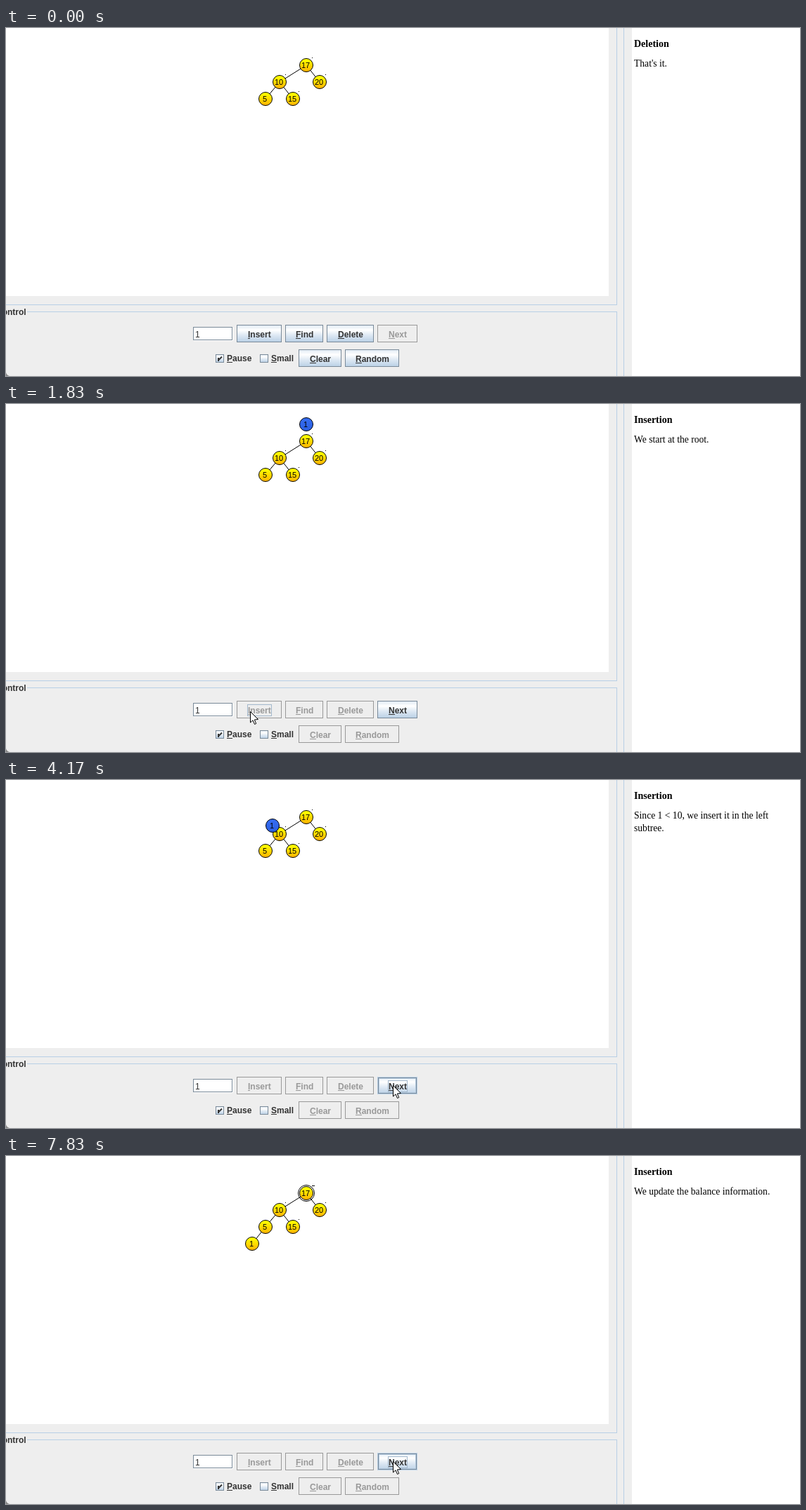
Recreate the animation shown at these times as an HTML page with a canvas. Size 1129 px wide and 496 px high, loop 8 s.

```html
<!DOCTYPE html>
<html lang="en">
<head>
<meta charset="utf-8">
<title>Tree insertion</title>
<style>
html, body { margin: 0; width: 100%; height: 100%; overflow: hidden; background: #eee; }
canvas { display: block; }
</style>
</head>
<body>
<canvas id="stage" width="1129" height="496"></canvas>
<script>
const g = document.getElementById('stage').getContext('2d');
const LOOP = 8000, TICK = 30, MOVE = 480, LEVEL = 24;
const SANS = '"Liberation Sans", Arial, sans-serif';
const SERIF = '"Liberation Serif", "Times New Roman", serif';
const LINE = '#b8cfe5', BORDER = '#7a8a99', FOCUS = '#a3b8cc';

// Columns follow key order, rows follow depth.
const keys = [1, 5, 10, 15, 17, 20];
const depth = { 17: 0, 10: 1, 20: 1, 5: 2, 15: 2, 1: 3 };
const edges = [[17, 10], [17, 20], [10, 5], [10, 15]];
const place = key => [Math.round(350 + 19.25 * keys.indexOf(key)), 53 + LEVEL * depth[key]];
const above = key => [place(key)[0], place(key)[1] - LEVEL];

// Each step: button press, release, the new node's goal or the ringed key, message
const steps = [
  { press: 900, at: 990, goal: above(17), lines: ['We start at the root.'] },
  { press: 2640, at: 2730, goal: above(10), lines: ['Since 1 < 17, we insert it in the left', 'subtree.'] },
  { press: 3780, at: 3960, goal: above(5), lines: ['Since 1 < 10, we insert it in the left', 'subtree.'] },
  { press: 5190, at: 5340, goal: place(1), lines: ['Node has been inserted. We go back and', 'update the balance information.'] },
  { press: 6540, at: 6690, ring: 5, lines: ['We update the balance information.'] },
  { press: 7650, at: 7830, ring: 17, lines: ['We update the balance information.'] }
];
const LINKED = steps[3].at;

const flick = (p, axis) => 1 - (1 - p) ** (6 + axis);
const glide = p => p * p * (3 - 2 * p);
const pointerStart = [1088, 73];
const legs = [
  { at: 150, span: 600, goal: [343, 441], ease: flick },
  { at: 1740, span: 90, goal: [347, 438], ease: glide },
  { at: 2130, span: 360, goal: [550, 435], ease: glide }
];

const mix = (a, b, p) => a + (b - a) * p;

function box(x, y, w, h, fill) {
  g.fillStyle = fill;
  g.fillRect(x, y, w, h);
}

function outline(x, y, w, h, color) {
  g.strokeStyle = color;
  g.strokeRect(x + .5, y + .5, w - 1, h - 1);
}

function text(s, x, y, font, color = '#000', align = 'left') {
  g.font = font;
  g.fillStyle = color;
  g.textAlign = align;
  g.fillText(s, x, y);
}

function line(x1, y1, x2, y2, color = '#000') {
  g.strokeStyle = color;
  g.beginPath();
  g.moveTo(x1, y1);
  g.lineTo(x2, y2);
  g.stroke();
}

function circle([x, y], r) {
  g.beginPath();
  g.arc(x, y, r, 0, 7);
  g.strokeStyle = '#000';
  g.stroke();
}

function shade(y, h, ...stops) {
  const fill = g.createLinearGradient(0, y, 0, y + h);
  for (const [at, color] of stops) fill.addColorStop(at, color);
  return fill;
}

const gloss = (y, h) => shade(y, h, [0, '#dde8f3'], [.3, '#fff'], [.6, '#dde8f3'], [1, LINE]);

function label(s, x, y, color) {
  text(s, x, y, 'bold 12px ' + SANS, color);
  box(x, y + 1, Math.round(g.measureText(s[0]).width), 1, color);
}

function button(s, x, y, w, { enabled = true, hover, pressed, focus } = {}) {
  const h = 25;
  box(x, y, w, h, !enabled ? '#eee' : pressed ? LINE : gloss(y, h));
  if (enabled && hover && !pressed) {
    outline(x, y, w, h, LINE);
    outline(x + 2, y + 2, w - 4, h - 4, LINE);
    outline(x + 1, y + 1, w - 2, h - 2, BORDER);
  } else {
    outline(x, y, w, h, enabled ? BORDER : '#999');
  }
  if (enabled && pressed) {
    box(x, y, w, 2, BORDER);
    box(x, y, 2, h, BORDER);
  }
  g.font = 'bold 12px ' + SANS;
  const tw = Math.round(g.measureText(s).width), tx = Math.round(x + (w - tw) / 2);
  if (focus) outline(tx - 1, y + 5, tw + 2, 17, FOCUS);
  label(s, tx, y + 18, enabled ? '#333' : '#999');
}

function checkbox(s, x, checked) {
  const y = 465;
  box(x, y, 12, 12, gloss(y, 12));
  outline(x, y, 12, 12, BORDER);
  if (checked) {
    box(x + 3, y + 5, 2, 5, '#333');
    g.lineWidth = 2;
    line(x + 4, y + 8.5, x + 9, y + 3.5, '#333');
    g.lineWidth = 1;
  }
  label(s, x + 16, 475, '#333');
}

function node(key, [x, y], blue) {
  const colors = blue ? ['#346cf2', '#2c5fe0'] : ['#ffff00', '#ffb000'];
  g.fillStyle = shade(y - 10, 20, [.1, colors[0]], [1, colors[1]]);
  g.beginPath();
  g.arc(x, y, 9.5, 0, 7);
  g.fill();
  circle([x, y], 9.5);
  text(key, x - 1, y + 4, '11px ' + SANS, '#000', 'center');
}

// The new node enters from beyond the corner and hops in ten equal jumps.
function newNodeAt(t) {
  let spot = [-10, -9];
  for (const { at, goal } of steps) {
    if (!goal || t < at) break;
    const jumps = Math.floor((t - at) / MOVE * 9 + .07) + 1;
    const p = Math.min(1, jumps / 10);
    spot = spot.map((v, i) => mix(v, goal[i], p));
  }
  return spot;
}

function pointerAt(t) {
  let spot = pointerStart;
  for (const { at, span, goal, ease } of legs) {
    const p = Math.min(1, Math.max(0, (t - at) / span));
    spot = spot.map((v, axis) => mix(v, goal[axis], ease(p, axis)));
  }
  return spot.map(Math.round);
}

function drawPanels() {
  box(0, 0, 1129, 496, '#eee');
  box(0, 0, 857, 382, '#fff');
  box(890, 0, 239, 496, '#fff');
  box(868, 0, 1, 395, LINE);
  box(0, 394, 869, 1, LINE);
  box(30, 404, 839, 1, LINE);
  box(868, 404, 1, 92, LINE);
  box(878, 0, 1, 496, LINE);
  text('Control', -14, 409, 'bold 12px ' + SANS, '#333');
  g.fillStyle = '#888';
  g.beginPath();
  g.moveTo(0, 491);
  g.quadraticCurveTo(1, 495, 5, 496);
  g.lineTo(0, 496);
  g.fill();
}

function drawTree(t, step) {
  const fresh = newNodeAt(t), linked = t >= LINKED;
  for (const [a, b] of edges) line(...place(a), ...place(b));
  if (linked) line(...place(5), ...fresh);
  for (const key of keys.slice(1)) {
    const [x, y] = place(key);
    node(key, [x, y]);
    box(x + 8, y - 11, step && step.ring === 17 && key === 17 ? 4 : 1, 1, '#000');
  }
  if (step) node(1, fresh, !linked);
  if (step && step.ring) circle(place(step.ring), 11.5);
}

function drawControls(t, step, [px, py]) {
  const idle = !step;
  const pressed = steps.some(({ press, at }) => t >= press && t < at);
  const over = (x, w) => t >= legs[0].at && px >= x && px < x + w && py >= 423 && py < 448;
  box(267, 427, 56, 19, '#fff');
  outline(266, 426, 56, 19, BORDER);
  text('1', 269, 441, '12px ' + SANS, '#333');

  const insertFocus = t >= steps[0].press && t < steps[1].press;
  button('Insert', 328, 423, 64, { enabled: idle, hover: over(328, 64), pressed, focus: insertFocus });
  button('Find', 397, 423, 54, { enabled: idle, hover: over(397, 54) });
  button('Delete', 456, 423, 67, { enabled: idle, hover: over(456, 67) });
  button('Next', 528, 423, 57, { enabled: !idle, hover: over(528, 57), pressed, focus: t >= steps[1].press });
  checkbox('Pause', 298, true);
  checkbox('Small', 361, false);
  button('Clear', 416, 458, 61, { enabled: idle });
  button('Random', 482, 458, 77, { enabled: idle });
}

function drawMessage(step) {
  const lines = step ? step.lines : ["That's it."];
  text(step ? 'Insertion' : 'Deletion', 893, 27, 'bold 14px ' + SERIF);
  lines.forEach((s, i) => text(s, 893, 55 + 18 * i, '13.6px ' + SERIF));
}

function drawPointer([x, y]) {
  const shape = [[0, 0], [0, 15.5], [3.5, 12.3], [6, 18], [8.2, 17], [5.8, 11.5], [11, 11]];
  g.beginPath();
  for (const [dx, dy] of shape) g.lineTo(x + dx + .5, y + dy + .5);
  g.closePath();
  g.fillStyle = '#fff';
  g.fill();
  g.strokeStyle = '#000';
  g.stroke();
}

function draw(t) {
  const step = steps.filter(({ at }) => t >= at).pop();
  const tip = pointerAt(t);
  drawPanels();
  drawTree(t, step);
  drawControls(t, step, tip);
  drawMessage(step);
  if (t >= legs[0].at) drawPointer(tip);
}

const begin = performance.now();
function tick() {
  const t = (performance.now() - begin) % LOOP;
  draw(Math.floor(t / TICK) * TICK);
  requestAnimationFrame(tick);
}
tick();
</script>
</body>
</html>
```
